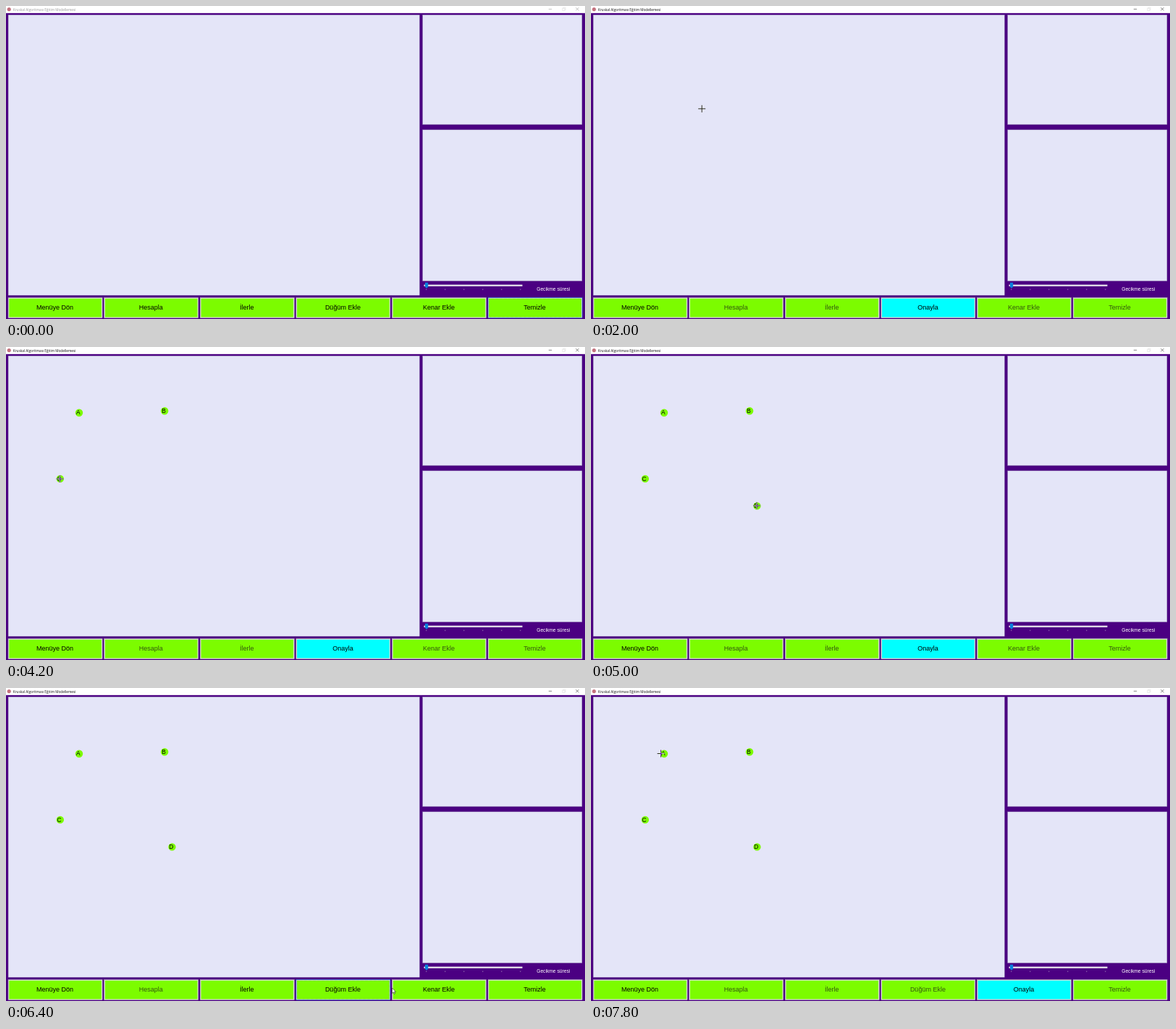
These frames come from a looping animation (800 px wide and 432 px high, 8 s). An HTML page:

```html
<!DOCTYPE html>
<html lang="tr">
<head>
<meta charset="utf-8">
<title>Kruskal Algoritması</title>
<style>
html, body { margin: 0; width: 100%; height: 100%; overflow: hidden; background: #4b0082; }
svg { display: block; width: 100vw; height: 100vh; }
text { font-family: "Liberation Sans", Arial, sans-serif; }
.title { font: 4.74px "Open Sans", sans-serif; }
</style>
</head>
<body>
<svg id="stage" viewBox="0 0 800 432" preserveAspectRatio="none"></svg>
<script>
const stage = document.getElementById("stage");
const LOOP = 8000, STEP = 200;
const GREEN = "#7cfc00", PANEL = "#e4e5f8", INDIGO = "#4b0082";

function add(tag, attrs, parent = stage, text) {
  const el = document.createElementNS("http://www.w3.org/2000/svg", tag);
  set(el, attrs);
  if (text) el.textContent = text;
  parent.appendChild(el);
  return el;
}
function set(el, attrs) {
  for (const key in attrs) el.setAttribute(key, attrs[key]);
}
function rect(x, y, width, height, fill, extra) {
  return add("rect", { x, y, width, height, fill, ...extra });
}
function show(el, on) {
  el.setAttribute("visibility", on ? "visible" : "hidden");
}

// Window frame and panels
rect(0, 0, 800, 432, INDIGO);
rect(0, 0, 800, 9.8, "#fff");
add("circle", { cx: 4.2, cy: 4.6, r: 2.6, fill: "#c4727e" });
const title = add("text", { x: 9.8, y: 6.6, class: "title" }, stage, "Kruskal Algoritması Eğitim Modellemesi");
const controls = add("path", { d: "M749.8 4.3h4.4M787.3 2.1l4.2 4.2m0-4.2l-4.2 4.2", fill: "none", "stroke-width": .6 });
add("path", { d: "M768.8 3.2h3.2v3.2h-3.2zM769.8 3.2v-1h3.2v3.2h-1", fill: "none", stroke: "#d4d4d4", "stroke-width": .5 });

const edge = { stroke: "#9288b0", "stroke-width": .4 };
rect(3.1, 12.2, 568.3, 387, PANEL, edge);
rect(575.7, 12.2, 220.2, 151.4, PANEL, edge);
rect(575.7, 170.9, 220.2, 208.6, PANEL, edge);

// Delay slider
rect(577.5, 384.6, 136, 2.2, "#e9e9ee");
add("path", { d: "M579 381.8h4.2v5.8l-2.1 2.2l-2.1-2.2z", fill: "#0a80dc" });
for (let i = 0; i < 6; i++) rect(580 + i * 26, 390.8, 1.4, .7, "#b9a9c9");
add("text", { x: 733.2, y: 393, "font-size": 6.7, fill: "#fff" }, stage, "Gecikme süresi");

// Toolbar
const labels = ["Menüye Dön", "Hesapla", "İlerle", "Düğüm Ekle", "Kenar Ekle", "Temizle"];
const buttons = labels.map((label, i) => {
  const x = 2.9 + i * 132.6;
  const frame = rect(x + .2, 402.6, 130, 28, "#e1e1e1", { "stroke-width": .5 });
  const box = rect(x + 1.4, 403.8, 127.6, 25.6, GREEN);
  const focus = rect(x + 1.6, 404, 127.2, 25.2, "none", { stroke: "#4f8a24", "stroke-width": .4, "stroke-dasharray": ".6 .6" });
  const text = add("text", { x: x + 64.7, y: 419.2, "font-size": 9, "text-anchor": "middle" }, stage, label);
  return { frame, box, focus, text, label };
});

// Graph nodes: name, position, time of placing, time of lettering
const nodes = [
  ["A", 101, 90.7, 2200, 2200],
  ["B", 219.1, 88.3, 3200, 3400],
  ["C", 74.8, 181.9, 4000, 4000],
  ["D", 229.4, 219.4, 4800, 4800]
].map(([name, cx, cy, placed, lettered]) => ({
  placed, lettered,
  dot: add("circle", { cx, cy, r: 5.2, fill: GREEN }),
  text: add("text", { x: cx - 1.2, y: cy + 2.7, "font-size": 8.3, "text-anchor": "middle" }, stage, name)
}));

// Pointers
const cross = add("path", { d: "M-5 0H5M0-5V5", stroke: "#fff", "stroke-width": .9, style: "mix-blend-mode:difference" });
const arrow = add("path", { d: "M0 0V7.4L1.7 5.8L2.8 8.3L4 7.8L2.9 5.4H5.2Z", fill: "#fff", stroke: "#000", "stroke-width": .5 });

// Pointer route: time, x, y
const route = [
  [800, 432, 429], [1200, 435, 420], [1400, 435, 419],
  [2200, 101, 90.5], [2400, 101, 90.5],
  [3000, 219.2, 88.2], [3200, 219.2, 88.2],
  [4000, 74.5, 182], [4200, 74.5, 182],
  [4800, 229, 219], [5000, 229, 219],
  [5800, 446.5, 388.5], [6000, 463, 412], [6200, 465, 414],
  [6600, 602, 414], [6800, 603, 413], [7000, 603, 413],
  [7800, 96.6, 90.5]
];
function pointerAt(t) {
  const i = route.findIndex(p => p[0] >= t);
  if (i < 1) return route[0].slice(1);
  const [t0, x0, y0] = route[i - 1], [t1, x1, y1] = route[i];
  const u = (t - t0) / (t1 - t0), e = u * u * (3 - 2 * u);
  return [x0 + (x1 - x0) * e, y0 + (y1 - y0) * e];
}

function draw(t) {
  const active = t >= 1200;
  set(title, { fill: active ? "#111" : "#999" });
  set(controls, { stroke: active ? "#333" : "#999" });

  // Index of the button in confirm mode, or -1
  const confirm = t >= 1400 && t < 6200 ? 3 : t >= 7000 ? 4 : -1;
  const focused = t < 1200 ? 5 : t < 6800 ? 3 : 4;
  buttons.forEach(({ frame, box, focus, text, label }, i) => {
    const on = i === confirm;
    const enabled = confirm < 0 ? i !== 1 || t < 6200 : on || i === 0;
    const hasFocus = confirm < 0 && i === focused;
    set(frame, { stroke: hasFocus ? "#0078d7" : "#adadad" });
    set(box, { fill: on ? "#00ffff" : GREEN });
    show(focus, hasFocus);
    set(text, { fill: enabled ? "#000" : "#335510" });
    text.textContent = on ? "Onayla" : label;
  });

  for (const n of nodes) {
    show(n.dot, t >= n.placed);
    show(n.text, t >= n.lettered);
  }

  const [x, y] = pointerAt(t);
  const drawing = confirm >= 0 && y < 399;
  show(cross, drawing);
  show(arrow, !drawing && t >= 800);
  set(drawing ? cross : arrow, { transform: `translate(${x} ${y})` });
}

const start = performance.now();
function tick() {
  const t = (performance.now() - start) % LOOP;
  draw(Math.floor(t / STEP) * STEP);
  requestAnimationFrame(tick);
}
tick();
</script>
</body>
</html>
```
